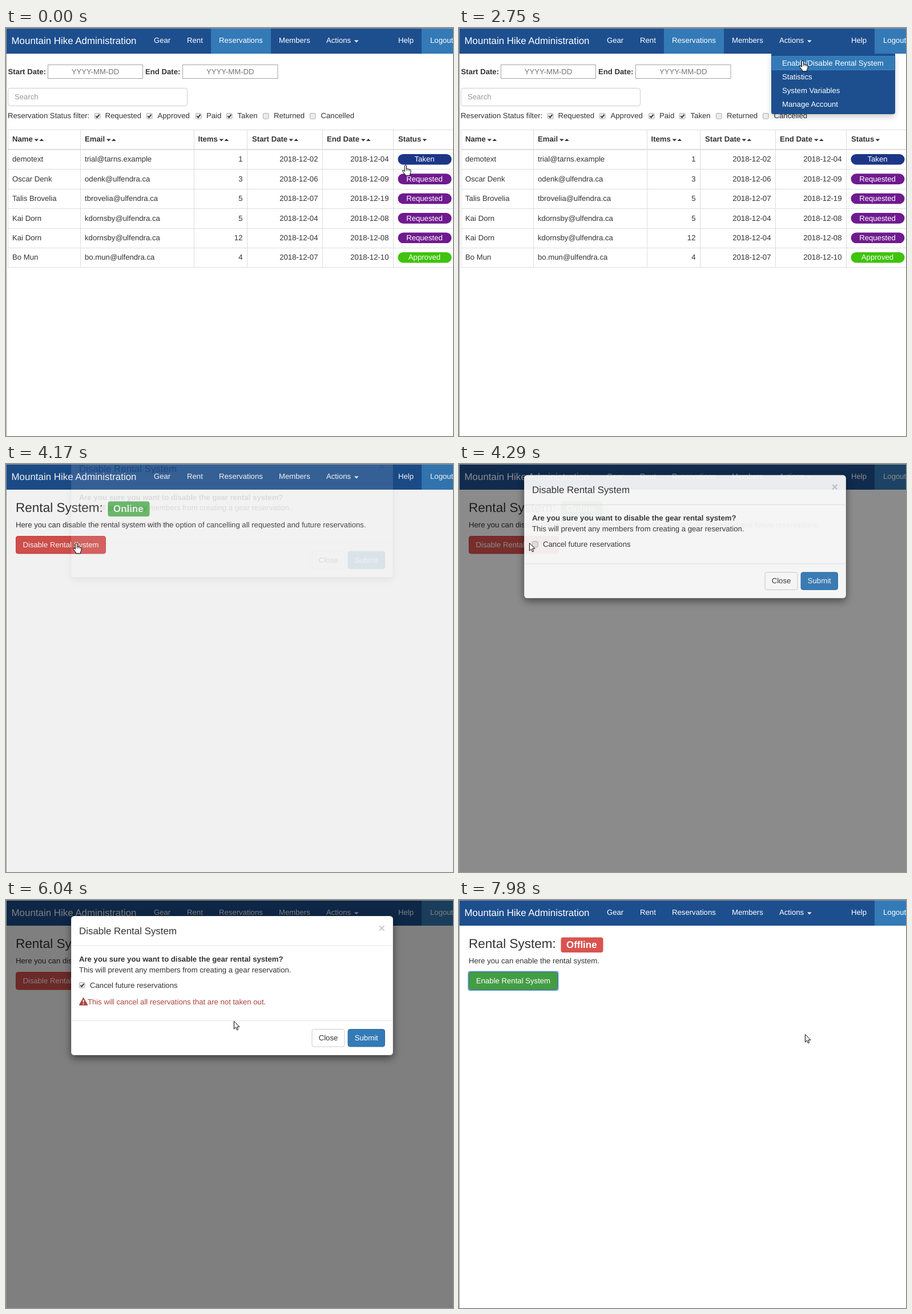
An HTML page that plays this animation: 783 px wide and 715 px high, repeating every 8000 ms.

```html
<!DOCTYPE html>
<html lang="en">
<head>
<meta charset="utf-8">
<title>Rental administration</title>
<style>
html, body { margin: 0; width: 100%; height: 100%; overflow: hidden; background: #fff; }
svg { display: block; width: 783px; height: 715px; font-family: "Liberation Sans", Arial, sans-serif; text-rendering: geometricPrecision; }
.panel { filter: drop-shadow(0 5px 7px rgba(0,0,0,.5)); }
.menu { filter: drop-shadow(0 5px 5px rgba(0,0,0,.18)); }
</style>
</head>
<body>
<svg id="stage" viewBox="0 0 783 715"></svg>
<script>
const stage = document.getElementById('stage');
const LOOP = 8000, BASE = 13.16, INK = '#333', NAVY = '#1d4f8f', BLUE = '#337ab7', RED = '#d9534f';

// Screen refreshes: runs of [first, last, count]
const RUNS = [[0, 0, 1], [120, 1150, 8], [1270, 2210, 7], [2330, 2750, 4], [2870, 2870, 1],
  [3300, 4170, 8], [4290, 4890, 5], [5260, 6040, 7], [6190, 7150, 8], [7300, 7420, 2], [7980, 7980, 1]];
const TICKS = RUNS.flatMap(([a, b, n]) =>
  Array.from({ length: n }, (_, i) => Math.round(n > 1 ? a + (b - a) * i / (n - 1) : a)));

// Pointer path: time, x, y, shape from that time on
const PATH = [
  [0, 700, 240, 'hand'], [480, 63, 371, 'hand'], [640, 75, 365, 'hand'], [1150, 690, 229, 'hand'],
  [1950, 591, 22, 'hand'], [2330, 594, 28, 'hand'], [2700, 602, 57, 'hand'], [2870, 602, 57, 'arrow'],
  [3200, 602, 57, 'arrow'], [3900, 123, 138, 'hand'], [4290, 123, 138, 'arrow'], [4440, 123, 138, 'arrow'],
  [4800, 133, 149, 'arrow'], [5400, 133, 149, 'arrow'], [6040, 399, 212, 'arrow'],
  [6200, 402, 213, 'arrow'], [6760, 625, 246, 'hand'], [7140, 625, 246, 'arrow'],
  [7900, 625, 246, 'arrow'], [7980, 606, 235, 'arrow']];

const clamp = v => Math.max(0, Math.min(1, v));

function text(x, y, s, o = {}) {
  return `<text x="${x}" y="${y}" font-size="${o.size || BASE}" fill="${o.fill || INK}"` +
    ` text-anchor="${o.anchor || 'start'}"${o.bold ? ' font-weight="700"' : ''}>${s}</text>`;
}

function box(x, y, w, h, fill, r = 0, stroke = 'none', extra = '') {
  return `<rect x="${x}" y="${y}" width="${w}" height="${h}" rx="${r}" fill="${fill}" stroke="${stroke}" ${extra}/>`;
}

function shape(d, fill, extra = '') {
  return `<path d="${d}" fill="${fill}" ${extra}/>`;
}

const caret = (x, y, up, fill = INK) => shape(`M${x} ${y}h7.6l-3.8 ${up ? -4 : 4}z`, fill);

function checkbox(x, y, on, hover) {
  return box(x + .5, y + .5, 9.6, 9.6, hover ? '#dcdcdc' : '#ececec', 1.5, hover ? '#777' : '#aaa') +
    (on ? shape(`M${x + 2.4} ${y + 5.4}l2.2 2.3l3.9 -5`, 'none', 'stroke="#3a3a3a" stroke-width="1.9"') : '');
}

function button(x, y, w, label, fill, edge, ink = '#fff', ring = false) {
  return (ring ? box(x - .5, y - .5, w + 1, 32.5, 'none', 3, '#5e97e6', 'stroke-width="2"') : '') +
    box(x + .5, y + .5, w - 1, 30.5, fill, 3.5, edge) +
    text(x + w / 2, y + 20, label, { fill: ink, anchor: 'middle' });
}

function nav(listing) {
  const links = [[259, 'Gear'], [317, 'Rent'], [373, 'Reservations'], [478, 'Members'],
    [561, 'Actions'], [687, 'Help'], [743, 'Logout']];
  return box(0, 0, 783, 45, NAVY) + box(728, 0, 55, 45, BLUE) +
    (listing ? box(359, 0, 105, 45, BLUE) : '') +
    text(9.5, 27.5, 'Mountain Hike Administration', { fill: '#fff', size: 16.92 }) +
    links.map(([x, s]) => text(x, 26, s, { fill: '#fff' })).join('') + caret(610, 21.5, false, '#fff');
}

const MAIL = '@ulfendra.ca';
const ROWS = [
  ['demotext', 'trial@tarns.example', 1, '02', '04', 'Taken'],
  ['Oscar Denk', 'odenk' + MAIL, 3, '06', '09', 'Requested'],
  ['Talis Brovelia', 'tbrovelia' + MAIL, 5, '07', '19', 'Requested'],
  ['Kai Dorn', 'kdornsby' + MAIL, 5, '04', '08', 'Requested'],
  ['Kai Dorn', 'kdornsby' + MAIL, 12, '04', '08', 'Requested'],
  ['Bo Mun', 'bo.mun' + MAIL, 4, '07', '10', 'Approved']];
const TINT = { Taken: '#1c3687', Requested: '#6f1a8f', Approved: '#3fc30c' };
const FILTERS = [[155, 173.5, 'Requested'], [246, 265.5, 'Approved'], [332, 351, 'Paid'],
  [386, 405.5, 'Taken'], [450, 469, 'Returned'], [532, 551.5, 'Cancelled']];
const HEADS = [[11, 'Name', 49], [138, 'Email', 175.5], [336.5, 'Items', 373],
  [431, 'Start Date', 495], [562, 'End Date', 621.5], [687, 'Status', 729]];

function dateField(x, label, left, w) {
  return text(x, 80.5, label, { bold: 1 }) + box(left + .5, 64.5, w, 24, '#fff', 0, '#a3a3a3') +
    text(left + w / 2 + .5, 80.5, 'YYYY-MM-DD', { fill: '#757575', anchor: 'middle' });
}

function tableRow([name, mail, items, from, to, status], i) {
  const mid = 230.2 + i * 34.4, y = mid + 4.2, end = { anchor: 'end' };
  return text(11, y, name) + text(138, y, mail) + text(414.5, y, items, end) +
    text(546.5, y, '2018-12-' + from, end) + text(670.5, y, '2018-12-' + to, end) +
    box(686.5, mid - 9.3, 94, 18.6, TINT[status], 9.3) +
    text(733, y, status, { fill: '#fff', anchor: 'middle' }) +
    box(3, Math.round(mid + 17.1), 780, 1, '#ddd');
}

function listPage() {
  return dateField(3.5, 'Start Date:', 73, 166) + dateField(244, 'End Date:', 309, 166.5) +
    box(3.5, 105.5, 314, 31, '#fff', 4, '#ccc') + text(15, 124.5, 'Search', { fill: '#999' }) +
    text(3, 157.5, 'Reservation Status filter:') +
    FILTERS.map(([x, tx, s], i) => checkbox(x, 149, i < 4) + text(tx, 158, s)).join('') +
    box(3, 178, 780, 1, '#ddd') + box(3, 212, 780, 2, '#ddd') +
    [3, 130, 329, 422, 554, 678].map(x => box(x, 178, 1, 242, '#ddd')).join('') +
    HEADS.map(([x, s, c], i) => text(x, 199, s, { bold: 1 }) + caret(c + .5, 194.5) +
      (i < 5 ? caret(c + 9.5, 198, true) : '')).join('') +
    ROWS.map(tableRow).join('');
}

function dropdown(hover) {
  const items = ['Enable/Disable Rental System', 'Statistics', 'System Variables', 'Manage Account'];
  return shape('M547 45H764V147q0 4 -4 4H551q-4 0 -4 -4z', NAVY, 'class="menu"') +
    (hover ? box(548.5, 49.5, 214, 24, BLUE, 0, '#3f85c6') : '') +
    items.map((s, i) => text(566, 66 + i * 24, s, { fill: '#fff' })).join('');
}

function systemPage(online, focused) {
  const green = focused ? '#449d44' : '#5cb85c';
  return text(17, 84, 'Rental System:', { size: 22.56 }) +
    box(178.5, 65.5, online ? 73 : 74, 26.5, online ? '#5cb85c' : RED, 4) +
    text(188, 84, online ? 'Online' : 'Offline', { size: 16.92, bold: 1, fill: '#fff' }) +
    text(17, 111, online
      ? 'Here you can disable the rental system with the option of cancelling all requested and future reservations.'
      : 'Here you can enable the rental system.') +
    (online ? button(17, 126, 158, 'Disable Rental System', RED, '#d43f3a')
      : button(17, 126, 156, 'Enable Rental System', green, focused ? '#398439' : '#4cae4c', '#fff', focused));
}

function dialog(s) {
  const foot = s.online ? (s.checked ? 211.5 : 183.5) : 156;
  const verb = s.online ? 'Disable' : 'Enable';
  const dark = s.submitHover || !s.online;
  let body = box(114, 28, 564, foot + 32.5, '#fff', 5.5, 'rgba(0,0,0,.2)', 'class="panel"') +
    text(128, 59.5, verb + ' Rental System', { size: 16.92 }) +
    text(652.5, 55.5, '×', { size: 19.7, bold: 1, fill: '#ccc' }) +
    box(114, 79.5, 564, 1, '#e5e5e5') + box(114, foot - .5, 564, 1, '#e5e5e5') +
    text(128, 108, `Are you sure you want to ${verb.toLowerCase()} the gear rental system?`, { bold: 1 }) +
    text(128, 126.5, s.online ? 'This will prevent any members from creating a gear reservation.'
      : 'This will allow members to create gear reservations again.') +
    button(535.5, foot + 14.5, 58, 'Close', '#fff', '#ccc', INK) +
    button(598.5, foot + 14.5, 65.5, 'Submit', dark ? '#286090' : BLUE, dark ? '#204d74' : '#2e6da4', '#fff', !s.online);
  if (s.online) body += checkbox(128, 144, s.checked, s.boxHover) + text(147, 154, 'Cancel future reservations');
  if (s.online && s.checked) {
    body += shape('M135.6 171.8L142.4 184H128.8Z', '#a94442', 'stroke="#a94442" stroke-width="1.6" stroke-linejoin="round"') +
      shape('M134.6 175h2l-.4 5h-1.2zM134.7 181.3h1.8v1.8h-1.8z', '#fff') +
      text(143, 182.5, 'This will cancel all reservations that are not taken out.', { fill: '#a94442' });
  }
  return `<g opacity="${s.fade}" transform="translate(0 ${s.lift})">${body}</g>`;
}

const HAND = 'M-1.6 1.2Q0 -.8 1.5 1.2V6.8Q3 5.8 4.2 7.3Q5.8 6.4 6.8 8Q8.8 7.5 9 9.4V13Q8.6 15 7.4 16.6V18.8H-.6V17Q-3.4 14 -5.2 10.9Q-5.8 9 -4 9.2Q-2.6 9.6 -1.6 11.4Z';
const KNUCKLES = 'M1.5 6.8V10M4.2 7.5V10M6.8 8.2V10.5';
const ARROW = 'M.4 .5V14L3.5 11.1L5.5 15.8L7.7 14.9L5.7 10.3H9.9Z';

function pointer(t) {
  const next = PATH.findIndex(p => p[0] > t);
  const a = next < 0 ? PATH[PATH.length - 1] : PATH[next - 1], b = next < 0 ? a : PATH[next];
  const p = b === a ? 0 : (t - a[0]) / (b[0] - a[0]), e = p * p * (3 - 2 * p);
  const x = a[1] + (b[1] - a[1]) * e, y = a[2] + (b[2] - a[2]) * e;
  const hand = a[3] === 'hand';
  return `<g transform="translate(${x} ${y})" stroke="#000" stroke-linejoin="round">` +
    shape(hand ? HAND : ARROW, '#fff') + (hand ? shape(KNUCKLES, 'none', 'stroke-width=".8"') : '') + '</g>';
}

function dialogState(t) {
  const online = t < 7130, since = t - (online ? 4153 : 7132);
  const shown = clamp(since / 150), rest = (1 - clamp(since / 300)) ** 3;
  return {
    online, checked: t >= 5260, boxHover: t >= 4740 && t < 5600, submitHover: t >= 6700,
    fade: online ? shown : 1 - shown,
    lift: online ? -54 * rest : -47 * (1 - rest)
  };
}

function scene(t) {
  const listing = t < 2870, s = dialogState(t);
  let out = box(0, 0, 783, 715, '#fff') + nav(listing);
  out += listing ? listPage() : systemPage(s.online, t >= 7420);
  if (listing && t >= 2050) out += dropdown(t >= 2460);
  if (s.fade > 0) out += box(0, 0, 783, 715, '#000', 0, 'none', `opacity="${s.fade / 2}"`) + dialog(s);
  return out + box(0, 0, 783, 1, '#999') + box(0, 0, 1, 715, '#999') + pointer(t);
}

const start = performance.now();
let drawn = -1;
function draw(now) {
  const t = Math.max(0, now - start) % LOOP;
  const tick = TICKS.filter(k => k <= t).pop();
  if (tick !== drawn) stage.innerHTML = scene(drawn = tick);
  requestAnimationFrame(draw);
}
draw(start);
</script>
</body>
</html>
```
